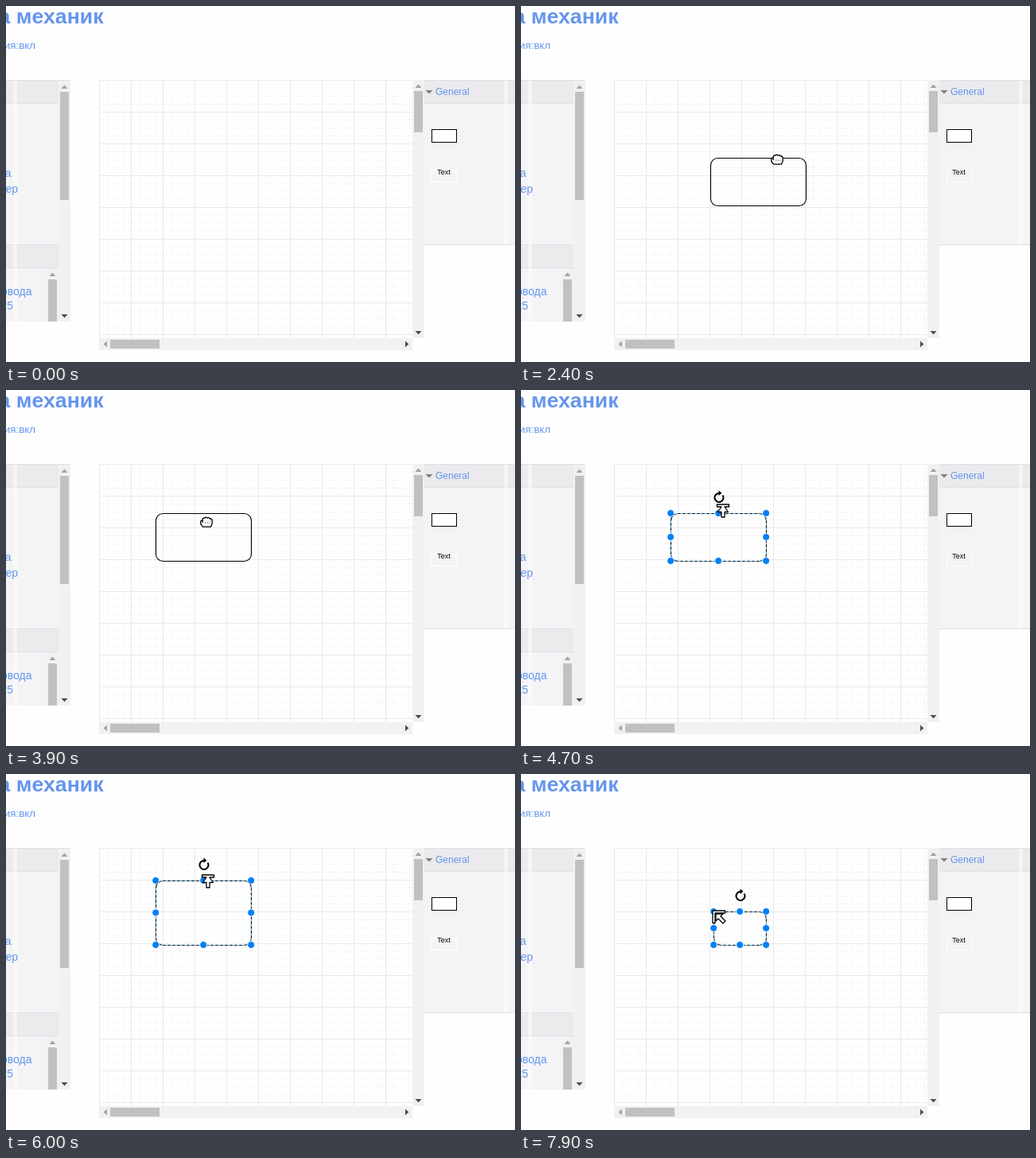
Write an HTML page that moves like this. It is 640 px wide and 448 px high and loops after 8000 ms.

```html
<!DOCTYPE html>
<html lang="ru">
<head>
<meta charset="utf-8">
<title>Diagram editor</title>
<style>
  html, body { margin: 0; width: 100%; height: 100%; overflow: hidden; background: #fefefe; }
  svg { display: block; width: 640px; height: 448px; }
  text { font-family: "Liberation Sans", Arial, sans-serif; fill: #6495ed; }
  .end { text-anchor: end; font-size: 14px; }
  .title { font-size: 20pt; font-weight: bold; }
  .note { font-size: 10pt; }
  .head { fill: #ebebee; }
  .body { fill: #f4f4f6; }
  .rule { stroke: #dfdfe5; }
  .cursor { fill: #fff; stroke: #000; stroke-width: 1.3; stroke-linejoin: round; }
</style>
</head>
<body>
<svg viewBox="0 0 640 448">
  <defs>
    <pattern id="grid" x="117" y="93" width="40" height="40" patternUnits="userSpaceOnUse">
      <path d="M10.5 0V40M20.5 0V40M30.5 0V40M0 10.5H40M0 20.5H40M0 30.5H40" stroke="#f3f3f6" stroke-dasharray="2 2"/>
      <path d="M.5 0V40M0 .5H40" stroke="#e9e9ec"/>
    </pattern>
  </defs>

  <text class="end title" x="122.5" y="22">а механик</text>
  <text class="end note" x="37" y="54">ия:вкл</text>

  <rect class="body" y="93" width="67" height="304"/>
  <rect class="head" y="93" width="67" height="30"/>
  <rect class="head" y="300" width="67" height="30"/>
  <path class="rule" d="M0 93.5H81M0 122.5H67M0 300.5H67M0 329.5H67"/>
  <rect x="9" y="94" width="5" height="303" fill="#fff" opacity=".5"/>
  <text class="end" x="6.5" y="215">а</text>
  <text class="end" x="15" y="235">ер</text>
  <text class="end" x="32.5" y="364">провода</text>
  <text class="end" x="9" y="382">25</text>

  <rect x="117" y="93" width="394" height="325" fill="url(#grid)"/>

  <rect class="body" x="526" y="93" width="114" height="207"/>
  <rect class="head" x="526" y="93" width="114" height="30"/>
  <path class="rule" d="M526 93.5H640M526 122.5H640M526 300.5H640"/>
  <rect x="626" y="94" width="5" height="206" fill="#fff" opacity=".5"/>
  <path d="M527.5 106h9l-4.5 4.5z" fill="#808080"/>
  <text x="540" y="112" font-size="12">General</text>
  <rect x="535.5" y="155.5" width="31" height="16" fill="#fff" stroke="#000"/>
  <rect x="535.5" y="206.5" width="31" height="15" fill="none" stroke="#fff"/>
  <text x="550.5" y="212" font-size="9" text-anchor="middle" style="fill:#000">Text</text>

  <g id="bars"></g>

  <rect id="shape" rx="9" fill="none" stroke="#000" stroke-width="1.1"/>
  <g id="selection">
    <rect id="frame" fill="none" stroke="#5fb0dc" stroke-dasharray="3 3"/>
    <g id="handles" fill="#0080f4" stroke="#fff"></g>
    <g id="rotor">
      <path d="M0 -5.5A5.5 5.5 0 1 0 4.6 -3" fill="none" stroke="#000" stroke-width="2"/>
      <path d="M-.5 -9L3.5 -5.7L-.5 -2.4Z"/>
    </g>
  </g>

  <g id="cursor" class="cursor">
    <path data-kind="arrow" d="M.5 .5V16.5L4.3 13L7 19.2L9.6 18.1L7 12H12Z"/>
    <g data-kind="hand">
      <path d="M-4.5 6.2L-7.2 2.5V-.5Q-6.8 -2.2 -4.8 -1.6V-3.6Q-3.8 -5.6 -2 -4.8Q-.6 -6.8 1 -4.9Q3 -6.2 4 -4.1Q6.4 -4.7 7.2 -2.2V2L5.5 6.2Z"/>
      <path d="M-4.8 -1.6V1" fill="none"/>
      <path d="M-2 1.2H5" fill="none" stroke="#777" stroke-dasharray="1.5 1.5"/>
    </g>
    <path data-kind="north" d="M-7.5 -8H7.5V-5H2L6.5 1.5H2V8H-2V1.5H-6.5L-2 -5H-7.5Z"/>
    <g data-kind="corner">
      <path d="M-8 -8H7.5V-5H-5V7.5H-8Z"/>
      <path d="M-4 -4H5L2 -1L8 5L5 8L-1 2L-4 5Z"/>
    </g>
  </g>
</svg>
<script>
const LOOP = 8000, STEP = 100;
const DROP = 1400, GRAB = 2300, RELEASE = 3900, SELECT = 4100;
const LAG = 160; // the shape trails the pointer

const $ = id => document.getElementById(id);

function set(el, attrs) {
  for (const name in attrs) el.setAttribute(name, attrs[name]);
}

function add(parent, tag, attrs) {
  const el = document.createElementNS("http://www.w3.org/2000/svg", tag);
  set(el, attrs);
  parent.append(el);
  return el;
}

const show = (el, on) => { el.style.display = on ? "" : "none"; };

// Motion helpers
const part = (t, from, to) => Math.min(1, Math.max(0, (t - from) / (to - from)));
const smooth = p => p * p * (3 - 2 * p);
const easeOut = p => 1 - (1 - p) ** 2;
const mix = (a, b, p) => a + (b - a) * p;
const line = (a, b, p) => [mix(a[0], b[0], p), mix(a[1], b[1], p)];
const bezier = (a, b, c, d, p) => {
  const q = 1 - p;
  return q ** 3 * a + 3 * q * q * p * b + 3 * q * p * p * c + p ** 3 * d;
};

// Each scroll bar is drawn upright, then placed
function scrollBar(place, length, thumb) {
  const bar = add($("bars"), "g", { transform: place });
  add(bar, "rect", { width: 15, height: length, fill: "#f1f1f1" });
  add(bar, "path", { d: "M3.5 10H11.5L7.5 5.6Z", fill: "#a3a3a3" });
  add(bar, "path", { d: `M3.5 ${length - 9}h8l-4 4.4z`, fill: "#505050" });
  add(bar, "rect", { x: 2, y: 14, width: 11, height: thumb, fill: "#c1c1c1" });
}
scrollBar("translate(66 94)", 303, 136);
scrollBar("translate(51 330)", 67, 53);
scrollBar("translate(511 93)", 325, 52);
scrollBar("translate(117 433) rotate(-90)", 394, 62);

const handles = [];
for (const v of [0, .5, 1])
  for (const u of [0, .5, 1])
    if (u !== .5 || v !== .5) handles.push({ u, v, el: add($("handles"), "circle", { r: 4.5 }) });

// Progress of the three resizing gestures
const stretch = t => smooth(part(t, 4800, 5600)) - smooth(part(t, 5600, 6600));
const shrink = t => smooth(part(t, 7000, 7900));

function shapeAt(t) {
  if (t < SELECT) {
    const p = part(t, GRAB, RELEASE - STEP);
    return { left: bezier(217, 340, 183, 188, p), top: bezier(193, 190, 56, 155, p), width: 120, height: 60 };
  }
  const s = shrink(t);
  const left = mix(188, 242, s);
  const top = 155 - 33 * stretch(t) + 18 * s * s;
  return { left, top, width: 308 - left, height: 215 - top };
}

function drawShape(t) {
  show($("shape"), t >= DROP);
  show($("selection"), t >= SELECT);
  const s = shapeAt(t);
  const left = Math.round(s.left), top = Math.round(s.top);
  const { width, height } = { width: Math.round(s.width), height: Math.round(s.height) };
  const box = { x: left + .5, y: top + .5, width, height };
  set($("shape"), box);
  set($("frame"), box);
  for (const { u, v, el } of handles) set(el, { cx: left + .2 + u * width, cy: top + v * height });
  set($("rotor"), { transform: `translate(${left + width / 2 + 1} ${top - 19.5})` });
}

function pointerAt(t) {
  if (t < 1100) return ["arrow", line([627, 82], [531, 134], easeOut(part(t, 400, 1000)))];
  if (t < DROP) return ["hand", line([541, 157], [544, 167], part(t, 1100, 1200))];
  if (t < GRAB) {
    const spot = line([544, 160], [281, 204], easeOut(part(t, 1300, 2200)));
    const { left, width } = shapeAt(t);
    return [spot[0] < left + width ? "hand" : "arrow", spot];
  }
  if (t < SELECT) {
    const { left, top } = shapeAt(t + LAG < SELECT ? t + LAG : RELEASE);
    return ["hand", [left + 64, top + 11]];
  }
  if (t < 4700) return ["hand", line([252, 166], [254, 153], smooth(part(t, 4200, 4600)))];
  if (t < 6700) return ["north", [254, shapeAt(t + LAG / 2).top - 3]];
  if (t < 7000) return ["hand", line([254, 155], [196, 157], smooth(part(t, 6600, 7000)))];
  return ["corner", line([196, 157], [249, 180], shrink(t))];
}

function drawCursor(t) {
  show($("cursor"), t >= 400);
  const [kind, [x, y]] = pointerAt(t);
  set($("cursor"), { transform: `translate(${Math.round(x)} ${Math.round(y)})` });
  for (const el of $("cursor").children) show(el, el.dataset.kind === kind);
}

const start = performance.now();
function tick() {
  const now = Math.max(0, performance.now() - start) % LOOP;
  const t = Math.floor(now / STEP) * STEP;
  drawShape(t);
  drawCursor(t);
  requestAnimationFrame(tick);
}
tick();
</script>
</body>
</html>
```
